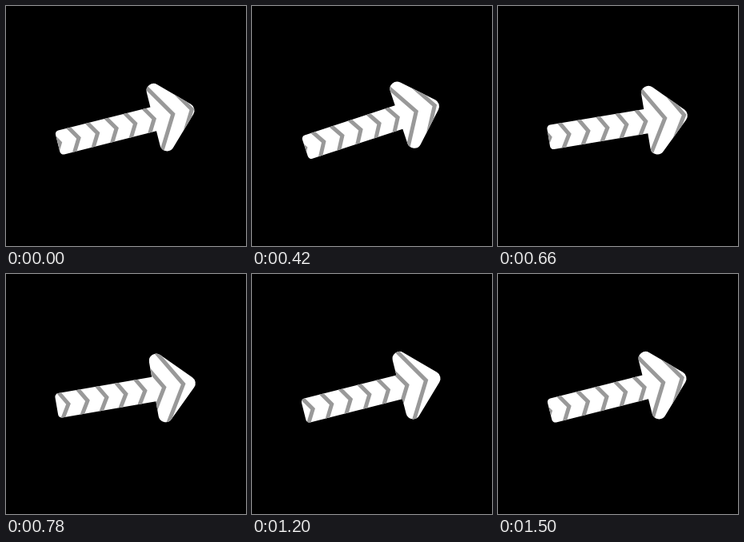
Write an HTML page that moves like this. It is 300 by 300 pixels and loops after 1.56 s.

```html
<!DOCTYPE html>
<html lang="en">
<head>
<meta charset="utf-8">
<title>Striped arrow</title>
<style>
  html, body { margin: 0; width: 100%; height: 100%; overflow: hidden; background: #000; }
  svg { display: block; width: 100vw; height: 100vh; }
</style>
</head>
<body>
<svg viewBox="0 0 300 300">
  <defs>
    <clipPath id="body">
      <path id="outline" d="M-83.5 -15.4H35.3V-34.3A9 9 0 0 1 50.6 -40.7L85.3 -6.4A9 9 0 0 1 85.3 6.4L50.6 40.7A9 9 0 0 1 35.3 34.3V15.4H-83.5A4.5 4.5 0 0 1 -88 10.9V-10.9A4.5 4.5 0 0 1 -83.5 -15.4Z"/>
    </clipPath>
  </defs>
  <rect width="300" height="300"/>
  <g id="arrow">
    <use href="#outline" fill="#fff"/>
    <g clip-path="url(#body)">
      <path id="stripes" fill="none" stroke="#999" stroke-width="5"/>
    </g>
  </g>
</svg>
<script>
  const LOOP = 1560, STEP = 60, GAP = 24.3;
  const REST = -14.2;

  // [time, value] pairs: tilt in degrees, stripe travel in gaps
  const TILT = [[0, 0], [350, -4.9], [700, 5], [1050, 0], [LOOP, 0]];
  const TRAVEL = [[0, 0], [240, 1.13], [540, 2.41], [780, 3.5], [960, 4.08],
                  [1200, 5.37], [1500, 6.91], [LOOP, 7]];

  const arrow = document.getElementById('arrow');
  const stripes = document.getElementById('stripes');
  const linear = p => p;
  const smooth = p => (1 - Math.cos(Math.PI * p)) / 2;

  function sample(keys, t, ease) {
    const i = keys.findIndex(k => k[0] > t);
    const [t0, a] = keys[i - 1], [t1, b] = keys[i];
    return a + (b - a) * ease((t - t0) / (t1 - t0));
  }

  // Chevrons reach past the head on both sides; the clip trims them
  let d = '';
  for (let i = -5; i <= 6; i++) {
    const x = i * GAP;
    d += `M${x - 30} -50L${x} 0L${x - 30} 50`;
  }
  stripes.setAttribute('d', d);

  function draw(ms) {
    const t = Math.floor((ms % LOOP) / STEP) * STEP;
    const angle = REST + sample(TILT, t, smooth);
    const shift = sample(TRAVEL, t, linear) % 1 * GAP + 12;
    arrow.setAttribute('transform', `translate(150 150) rotate(${angle})`);
    stripes.setAttribute('transform', `translate(${shift})`);
  }

  let start;
  function tick(now) {
    start ??= now;
    draw(now - start);
    requestAnimationFrame(tick);
  }
  draw(0);
  requestAnimationFrame(tick);
</script>
</body>
</html>
```
